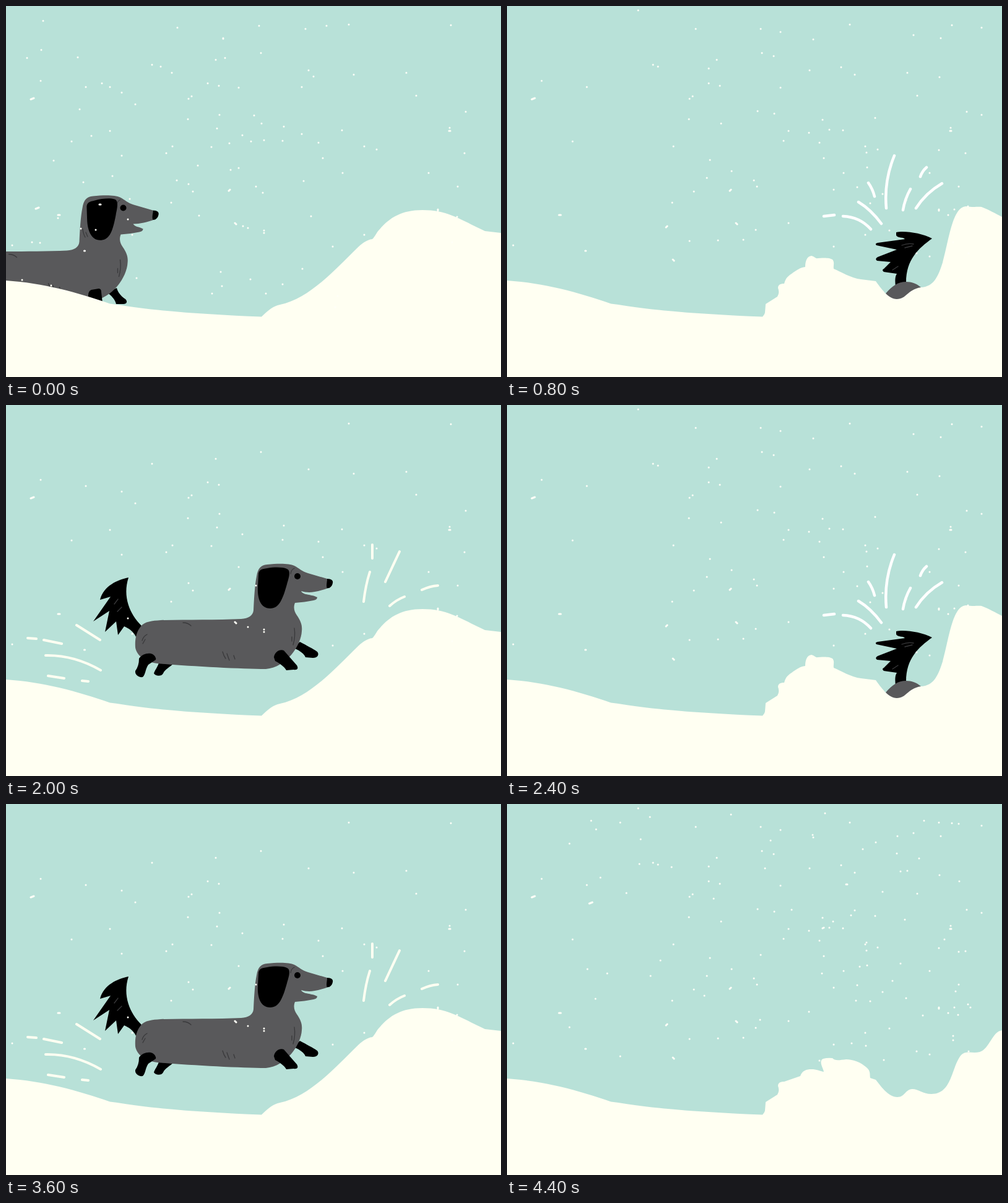
These frames come from a looping animation (800x600 px, 4800 ms). An HTML page:

```html
<!DOCTYPE html>
<html lang="en">
<head>
<meta charset="utf-8">
<title>Dog jumping into the snow</title>
<style>
  html, body { margin: 0; width: 100%; height: 100%; overflow: hidden; background: #b8e1d8; }
  svg { display: block; width: 800px; height: 600px; }
  .snow { fill: #fffff2; }
  .grey { fill: #59595b; }
  .sky { fill: #b8e1d8; }
  .fur, .trail, .flakes { fill: none; stroke-linecap: round; stroke-linejoin: round; }
  .fur { stroke: #39393b; stroke-width: 1.3; }
  .trail { stroke: #fffff2; stroke-width: 4; }
  .splash { stroke: #fff; stroke-width: 4.5; }
  .flakes { stroke: #fffff8; stroke-width: 3; }
</style>
</head>
<body>
<svg viewBox="0 0 800 600">
  <defs>
    <g id="body">
      <path class="grey" d="M218 358C224 350 236 349 250 348C290 347 340 348 380 346C392 345 399 341 400 332C401 312 402 292 405 277C407 264 412 259 422 258C440 256 458 256 466 260C474 264 478 269 488 272L519 281V297L503 311Q503 315 497 316C488 318 477 319 467 320C464 328 466 334 470 340C477 350 479 357 478 366C477 388 454 424 420 427C380 427 290 422 245 418C225 416 211 405 209 392C208 378 211 366 218 358Z"/>
      <path d="M519 281C526 281 529 284 528 288C527 293 524 296 519 297C517 292 519 287 519 281Z"/>
      <circle cx="471" cy="277" r="5"/>
      <path class="fur" d="M460 273Q461 266 466 264M286 352Q294 352 299 357M350 399Q352 406 355 410M357 402L361 413M368 405L370 411M466 361Q468 374 464 388M462 375V382"/>
    </g>
    <path id="ear" d="M408 275C408 266 414 265 422 264C434 262 447 262 454 265C461 268 457 280 454 290C447 315 441 329 427 329C411 329 406 312 407 294Z"/>
  </defs>

  <rect class="sky" width="800" height="600"/>

  <g data-poses="0">
    <path d="M163 463L179 456C181 464 187 470 193 474C197 478 195 482 190 482L178 482C176 474 170 468 163 463Z"/>
    <g transform="translate(-281.5 49.5)">
      <use href="#body"/>
      <use href="#ear" transform="translate(3) rotate(-5 432 265)"/>
      <path class="sky" d="M521 296C510 300 498 303 487 303C490 308 496 307 503 311L530 305Z"/>
    </g>
    <path d="M133 468Q133 461 138 459L150 457Q154 457 154 463L156 480H133Z"/>
    <path class="fur" d="M124 361Q125 369 128 374M129 366L132 373"/>
  </g>

  <g data-poses="1">
    <path d="M198 279C180 283 158 292 152 315L169 310L141 350L167 333L160 367L178 350L181 372L191 358C198 361 206 366 210 375L219 357C200 338 188 310 198 279Z"/>
    <path d="M247 417L271 418C265 424 257 427 254 434C251 440 241 438 239 434C241 428 245 424 247 417Z"/>
    <path d="M467 390L475 383C486 389 496 394 503 399C507 404 503 409 496 409L484 408C482 402 474 397 467 394Z"/>
    <use href="#body"/>
    <use href="#ear"/>
    <path class="sky" d="M521 296C510 300 498 303 490 303Q483 303 477 301C480 308 495 306 503 311L530 305Z"/>
    <path d="M215 410C220 402 231 400 237 403Q243 407 242 412L230 420C225 427 226 435 221 440C214 441 208 436 209 430Q215 422 215 410Z"/>
    <path d="M433 408C434 399 443 394 449 397L470 421C473 426 471 429 465 428L453 429C450 423 441 417 435 414Z"/>
    <path class="fur" d="M220 381Q222 374 228 371M221 386L225 379M175 322L181 314M180 334L187 327"/>
    <path class="trail" d="M592 226V248M588 270Q581 292 578 318M636 237L613 286M620 325Q631 315 644 310M672 299Q685 293 698 292M35 377L49 378M61 380L90 386M114 356L152 380M64 405Q110 404 153 429M68 438L94 442M123 446L133 447"/>
  </g>

  <g data-poses="2">
    <path d="M629 366C642 363 670 367 687 376C665 392 645 410 645 447V454H628C627 443 627 438 630 433L609 430Q605 427 609 425L620 414L598 412Q594 409 599 406L630 394L597 387Q594 384 599 383L643 377C640 373 632 376 629 371Z"/>
    <path class="fur" d="M638 387Q648 383 657 385M643 391L655 388M623 427L632 421"/>
    <path class="grey" d="M612 465C622 453 632 446 645 446C654 446 662 449 669 455L650 480H620Z"/>
    <path class="trail splash" d="M512 340L529 338M543 340Q570 341 588 361M568 317Q588 329 605 352M584 286Q591 296 594 308M626 242Q609 283 613 327M652 296Q643 312 640 330M668 276Q671 267 678 261M661 327Q677 302 703 287"/>
  </g>

  <g class="snow">
    <path d="M0 444C60 448 115 463 168 481.500L180 483C230 492 320 499 413 502.500L420 600H0Z"/>
    <path data-poses="01" d="M413 502.500C424 492 432 485 443 483C490 473 530 428 566 393C575 384 583 378 592 377C596 374 598 367 604 361C620 342 640 330 673 330C715 330 735 346 774 364L800 367V600H400Z"/>
    <path data-poses="2" d="M413 502.500Q417 498 417 495L418 482L437 470Q441 464 438 456C438 450 443 449 448 449C450 442 452 438 460 433C468 427 474 423 482 422C482 414 484 405 492 404C497 405 499 409 502 408C512 407 522 407 526 410C530 415 527 419 528 425C540 430 556 440 572 442L596 445C604 456 616 474 630 474C646 474 646 459 669 455C690 454 697 437 704 415C715 375 720 325 742 324C755 326 760 324 767 325C778 329 790 336 800 341V600H400Z"/>
    <path data-poses="3" d="M413 502.500Q417 498 417 495L418 482L437 470Q441 464 438 456C438 450 443 449 448 449L474 440C477 431 484 429 492 429C502 429 508 433 512 433C511 427 503 416 511 412Q518 410 526 411C530 416 538 414 548 413C560 413 572 418 581 426C588 432 586 437 587 443L596 446C604 456 616 474 631 474C643 474 643 462 655 461C665 461 672 469 686 469C720 469 718 425 734 406C742 398 752 404 764 401C780 396 784 368 800 366V600H400Z"/>
  </g>

  <g class="flakes" id="flakes">
    <path d="M40 151l5 -2M716 202h2M360 299l2 -2M370 351l2 2M84 338h3M698 329v2M126.500 396h1"/>
    <path data-poses="0" d="M48 328l5 -2M151 321h2M351 52v1"/>
    <path data-poses="23" d="M257 358l2 -2M268 410l2 2"/>
    <path data-poses="3" d="M133 161l5 -2M548 130h2M510 201l2 -1"/>
  </g>
</svg>
<script>
  const POSE_MS = 400, POSES = 4;
  let seed = 7;

  function random() {
    seed = (seed * 16807) % 2147483647;
    return seed / 2147483647;
  }

  // Scatters round flakes over a box of sky; they show only in the given poses.
  function scatter(poses, count, left, top, right, bottom) {
    const path = document.createElementNS('http://www.w3.org/2000/svg', 'path');
    let d = '';
    for (let i = 0; i < count; i++) {
      const x = Math.round(left + random() * (right - left));
      const y = Math.round(top + random() * (bottom - top));
      d += `M${x} ${y}h.01`;
    }
    path.setAttribute('d', d);
    path.dataset.poses = poses;
    document.getElementById('flakes').append(path);
  }

  scatter('0123', 38, 10, 8, 790, 420);
  scatter('01', 17, 165, 140, 450, 390);
  scatter('0', 55, 15, 20, 540, 490);
  scatter('23', 48, 210, 5, 770, 410);
  scatter('3', 58, 100, 8, 760, 430);

  const parts = document.querySelectorAll('[data-poses]');

  function draw(now) {
    const pose = Math.floor(now / POSE_MS) % POSES;
    for (const part of parts) {
      part.style.display = part.dataset.poses.includes(pose) ? '' : 'none';
    }
    requestAnimationFrame(draw);
  }
  draw(0);
</script>
</body>
</html>
```
